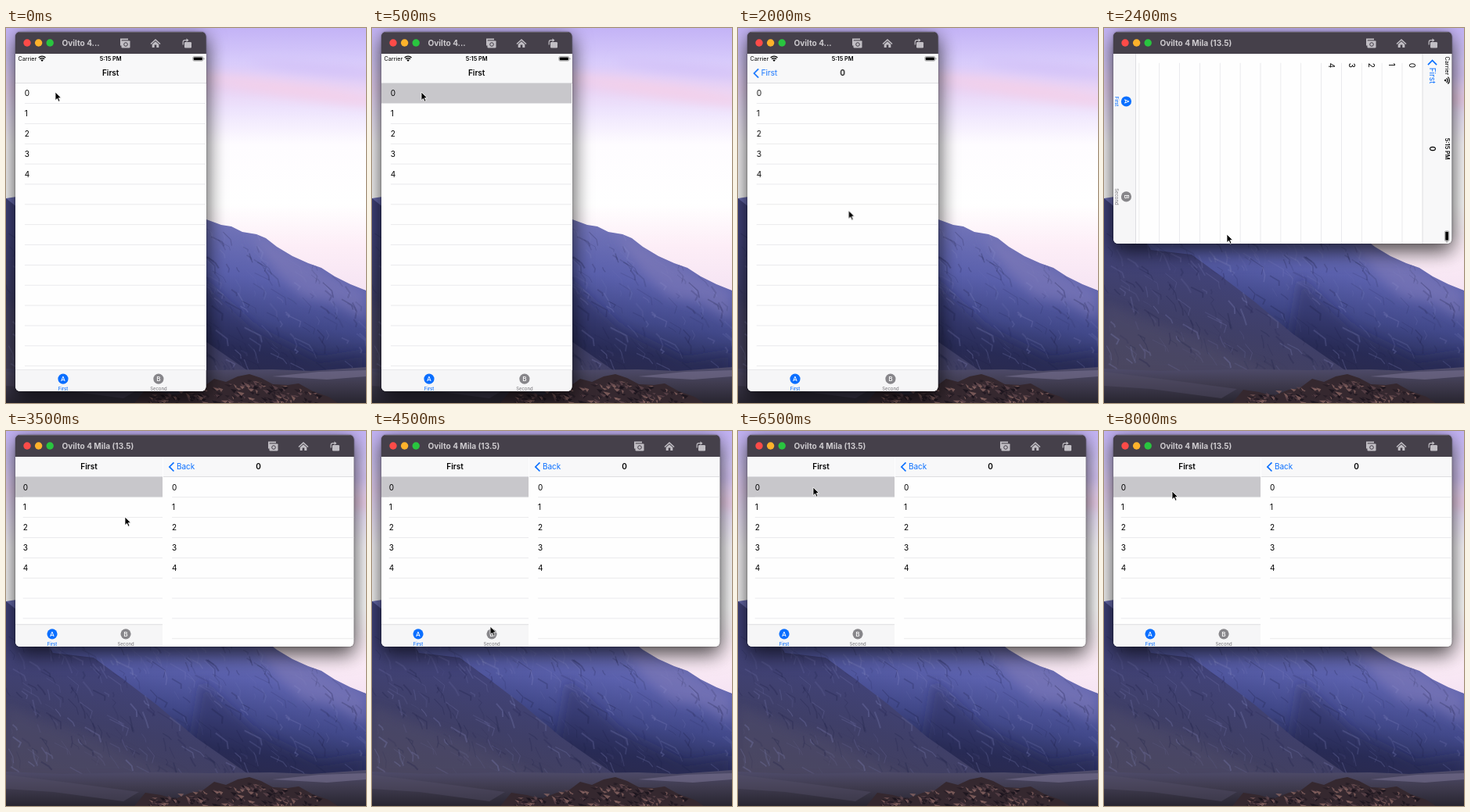
An HTML page that plays this animation: 460x480 px, repeating every 8100 ms.

```html
<!DOCTYPE html>
<html lang="en">
<head>
<meta charset="utf-8">
<title>Split view rotation</title>
<style>
html, body { margin: 0; width: 100%; height: 100%; overflow: hidden; background: #fff; }
svg { display: block; width: 460px; height: 480px; }
text { font-family: Inter, Roboto, sans-serif; }
.mid { text-anchor: middle; }
.shadow { filter: drop-shadow(0 8px 13px rgba(0,0,0,.58)) drop-shadow(0 0 1px rgba(0,0,0,.5)); }
.a { animation: 8.1s ease-in-out infinite both; }
.step { animation-timing-function: step-end; }

.tall { animation-name: tall; }
.wide { animation-name: wide; }
.press { animation-name: press; }
.root { animation-name: root; }
.push { animation-name: push; }
.oldTitle { animation-name: oldTitle; }
.newTitle { animation-name: newTitle; }
.back { animation-name: back; }
.still { animation-name: still; }
.turn { animation-name: turn; }
.settled { animation-name: settled; }
.before { animation-name: before; }
.after { animation-name: after; }
.tabA { animation-name: tabA; }
.tabB { animation-name: tabB; }
.cursor { animation-name: cursor; }

@keyframes tall { 0% { opacity: 1 } 27.16%, 100% { opacity: 0 } }
@keyframes wide { 0% { opacity: 0 } 27.16%, 100% { opacity: 1 } }
@keyframes press { 0% { opacity: 0 } 4.94%, 100% { opacity: 1 } }
@keyframes root { 0%, 6.17% { transform: none } 11.11%, 100% { transform: translate(-124px, 0) } }
@keyframes push { 0%, 6.17% { transform: translate(414px, 0) } 11.11%, 100% { transform: none } }
@keyframes oldTitle { 0%, 6.17% { transform: none; opacity: 1 } 11.11%, 100% { transform: translate(-158px, 0); opacity: 0 } }
@keyframes newTitle { 0%, 6.17% { transform: translate(190px, 0); opacity: 0 } 11.11%, 100% { transform: none; opacity: 1 } }
@keyframes back { 0%, 6.17% { transform: translate(158px, 0); opacity: 0 } 11.11%, 100% { transform: none; opacity: 1 } }
@keyframes still { 0% { visibility: visible } 30.25%, 100% { visibility: hidden } }
@keyframes turn { 0% { visibility: hidden } 30.25% { visibility: visible } 35.2%, 100% { visibility: hidden } }
@keyframes settled { 0% { visibility: hidden } 35.2%, 100% { visibility: visible } }
@keyframes before {
  0%, 30.25% { transform: rotate(90deg); opacity: 1 }
  35.2%, 100% { transform: rotate(0deg); opacity: 0 }
}
@keyframes after {
  0%, 30.25% { transform: rotate(90deg); opacity: 0 }
  35.2%, 100% { transform: rotate(0deg); opacity: 1 }
}
@keyframes tabA { 0% { opacity: 1 } 61.73% { opacity: 0 } 72.84%, 100% { opacity: 1 } }
@keyframes tabB { 0% { opacity: 0 } 61.73% { opacity: 1 } 72.84%, 100% { opacity: 0 } }
@keyframes cursor {
  0%, 18.5% { transform: translate(63px, 82px) }
  27.16%, 33.3% { transform: translate(157px, 264px) }
  42%, 46% { transform: translate(152px, 110px) }
  58%, 67.3% { transform: translate(151px, 263px) }
  72.2%, 74.5% { transform: translate(60px, 260px) }
  80.25%, 88.9% { transform: translate(96px, 72px) }
  98.5%, 100% { transform: translate(87px, 77px) }
}
</style>
</head>
<body>
<svg viewBox="0 0 460 480" xmlns="http://www.w3.org/2000/svg">
  <defs>
    <linearGradient id="sky" x2="0" y2="1">
      <stop offset="0" stop-color="#c3b3f6"/>
      <stop offset=".09" stop-color="#d8cbfb"/>
      <stop offset=".16" stop-color="#e8d3f5"/>
      <stop offset=".22" stop-color="#eee4fd"/>
      <stop offset=".31" stop-color="#fefcff"/>
      <stop offset=".47" stop-color="#fff"/>
      <stop offset=".58" stop-color="#fdeef7"/>
      <stop offset=".72" stop-color="#f4e2f2"/>
    </linearGradient>
    <linearGradient id="far" gradientUnits="userSpaceOnUse" x1="330" y1="255" x2="300" y2="440">
      <stop offset="0" stop-color="#7274b8"/>
      <stop offset=".35" stop-color="#5a60ac"/>
      <stop offset=".62" stop-color="#414889"/>
      <stop offset=".85" stop-color="#292e5a"/>
      <stop offset="1" stop-color="#2c2d4e"/>
    </linearGradient>
    <linearGradient id="near" gradientUnits="userSpaceOnUse" x1="100" y1="280" x2="60" y2="450">
      <stop offset="0" stop-color="#42447e"/>
      <stop offset=".5" stop-color="#3f3f68"/>
      <stop offset="1" stop-color="#454159"/>
    </linearGradient>
    <linearGradient id="plain" x2="0" y2="1">
      <stop offset="0" stop-color="#4f4c6c"/>
      <stop offset=".45" stop-color="#403c50"/>
      <stop offset="1" stop-color="#282530"/>
    </linearGradient>
    <filter id="soft" x="-30%" y="-100%" width="160%" height="300%"><feGaussianBlur stdDeviation="7"/></filter>
    <clipPath id="hill"><path d="M0 218L120 200 220 222 256 245 275 252 288 254 302 261 320 264 332 269 346 280 366 292 386 301 403 307 420 318 440 328 460 336V445H0Z"/></clipPath>
    <clipPath id="tallClip"><rect x="12" y="5" width="243.5" height="460" rx="6"/></clipPath>
    <clipPath id="wideClip"><rect x="12" y="5" width="432.5" height="271" rx="6"/></clipPath>
  </defs>

  <rect width="460" height="480" fill="url(#sky)"/>
  <g filter="url(#soft)">
    <ellipse cx="370" cy="80" rx="130" ry="9" fill="#f3d0ea" transform="rotate(8 370 80)"/>
    <ellipse cx="400" cy="52" rx="90" ry="7" fill="#d3c2f8" transform="rotate(6 400 52)"/>
  </g>
  <g clip-path="url(#hill)">
    <rect y="190" width="460" height="260" fill="url(#far)"/>
    <g filter="url(#soft)">
      <path d="M310 262L345 280 403 310 460 337V375L420 352 380 345 350 318Z" fill="#8d83bd" opacity=".45"/>
      <path d="M250 320L320 385 400 425 460 415V450H230Z" fill="#23264e" opacity=".4"/>
    </g>
    <path d="M0 218L40 250 60 284 112 290 150 318 192 350 242 392 318 445H0Z" fill="url(#near)"/>
    <path d="M0 350L50 372 110 392 190 430 230 445H0Z" fill="#56526e" opacity=".35" filter="url(#soft)"/>
    <g id="ridges" fill="none"></g>
  </g>
  <path d="M0 436L70 439 190 437 260 438 340 437 390 439 460 434V480H0Z" fill="url(#plain)"/>
  <path d="M340 446L400 440 460 438V446L410 450Z" fill="#77708f" opacity=".6"/>
  <path d="M0 440L80 450 170 462 150 474 60 462 0 458Z" fill="#55506a" opacity=".4"/>
  <path d="M164 480L178 463 198 466 216 471 236 463 250 461 266 449 281 453 296 446 311 443 326 448 341 456 360 457 374 455 392 465 412 472 424 480Z" fill="#35282f"/>
  <g id="rocks"></g>

  <g id="windows"></g>
  <g class="a cursor"><path d="M0 0V10.6L2.5 8.3 4.2 12.2 6 11.4 4.3 7.6H7.6Z" stroke="#fff" stroke-width=".8"/></g>
</svg>

<script>
const BLUE = '#0a6fff', GRAY = '#87868a', LINE = '#e6e6e9', EDGE = '#d3d3d7';
const $ = id => document.getElementById(id);

const rect = (x, y, w, h, fill, more = '') =>
  `<rect x="${x}" y="${y}" width="${w}" height="${h}" fill="${fill}" ${more}/>`;
const text = (x, y, size, s, more = '') =>
  `<text x="${x}" y="${y}" font-size="${size}" ${more}>${s}</text>`;
const group = (cls, s) => `<g class="${cls}">${s}</g>`;
const move = (x, y, s) => `<g transform="translate(${x} ${y})">${s}</g>`;
const title = (x, y, s) => text(x, y, 17, s, 'class="mid" font-weight="600"');

// Screen content is laid out in points; one point is PT pixels.
const PT = 432.5 / 736, ROW = 44;

function list(w, h, first, inset, mark = '') {
  let s = rect(0, 0, w, h, '#fefefe') + mark;
  for (let i = 0; i < 5; i++) s += text(inset, i * ROW + 28.5, 17, first + i);
  for (let y = ROW; y < h; y += ROW) s += rect(inset, y - .6, w - inset, 1.4, LINE);
  return s;
}

const selected = w => rect(0, 0, w, ROW, '#c8c7cb');

const backButton = (y, s) =>
  `<path d="M24 ${y - 9.5}L14.5 ${y}L24 ${y + 9.5}" fill="none" stroke="${BLUE}" stroke-width="2.8"/>` +
  text(30, y + 6, 17, s, `fill="${BLUE}"`);

function tabBar(w, active) {
  const tab = (i, letter, label) => {
    const x = w * (.25 + i * .5), c = i === active ? BLUE : GRAY;
    return `<circle cx="${x}" cy="21" r="11.2" fill="${c}"/>` +
      text(x, 26, 14, letter, 'class="mid" fill="#fff" font-weight="500"') +
      text(x, 46, 10, label, `class="mid" fill="${c}" font-weight="500"`);
  };
  return rect(0, 0, w, 50, '#f6f6f7') + rect(0, 0, w, 1.2, EDGE) +
    tab(0, 'A', 'First') + tab(1, 'B', 'Second');
}

const statusBar = text(6, 15, 12.3, 'Carrier') +
  `<g fill="none" stroke="#000" stroke-width="2.1"><path d="M50.5 8.500A10.5 10.5 0 0 1 65.500 8.500M53 11.500A7 7 0 0 1 63 11.500"/></g>
   <path d="M55 13.700A4.300 4.300 0 0 1 61 13.700L58 17Z"/>` +
  text(207, 15, 12.6, '5:15 PM', 'class="mid" font-weight="600"') +
  rect(386, 6, 22, 9.5, 'none', 'rx="2.5" stroke="#777" stroke-width="1"') +
  rect(387.5, 7.5, 19, 6.5, '#000', 'rx="1.3"') + rect(409, 9, 1.6, 3.5, '#777');

function phone(live) {
  const cls = name => live ? 'a ' + name : '';
  const root = live ? group('a root', list(414, 623, 0, 20, group('a step press', selected(414)))) : '';
  return rect(0, 0, 415, 737, '#fff') +
    move(0, 64, root + group(cls('push'), list(415, 623, 0, 20))) +
    rect(0, 0, 415, 64, '#f8f8f9') + rect(0, 63.2, 415, 1.2, EDGE) + statusBar +
    (live ? group('a oldTitle', title(207, 48.5, 'First')) : '') +
    group(cls('newTitle'), title(207, 48.5, '0')) +
    group(cls('back'), backButton(42.5, 'First')) +
    move(0, 687, tabBar(415, 0));
}

function split() {
  const bar = w => rect(0, 0, w, ROW, '#f8f8f9') + rect(0, 43, w, 1.2, EDGE);
  const side = (cls, name, first, active, mark) => group('a step ' + cls,
    move(0, ROW, list(320, 322, first, 16.5, mark)) + bar(320) +
    title(160, 28, name) + move(0, 365, tabBar(320, active)));
  const detail = move(0, ROW, list(416, 371, 0, 20)) + bar(416) +
    title(208, 28, '0') + backButton(22, 'Back');
  return rect(0, 0, 736, 415, '#fff') +
    side('tabA', 'First', 0, 0, selected(320)) + side('tabB', 'Second', 5, 1) +
    move(320.5, 0, detail) + rect(320, 0, 1.2, 415, '#cdcdd1');
}

const icons = [
  `<path d="M-6 -6H4V-4H-4V3H-6Z"/><rect x="-4.500" y="-3.500" width="11" height="9.500" rx="1.300"/>
   <g fill="none" stroke="#45404a"><circle cx="1" cy="1.500" r="2.300"/><path d="M-4.500 -3.500H6" stroke-width=".7"/></g>`,
  `<path d="M-6.500 .5L0 -5.500 6.500 .5 5.500 1.500 0 -3.500 -5.500 1.500ZM-4.300 1.500L0 -2.300 4.300 1.500V5.500H1.300V2H-1.300V5.500H-4.300Z"/>`,
  `<rect x="-3" y="-1.500" width="9" height="7.500" rx="1.200"/>
   <path d="M-4.800 2V-1.500Q-4.800 -3.800 -2.500 -3.800H0" fill="none" stroke="#c1bec4" stroke-width="1.200"/><path d="M-.5 -6.200L2.500 -3.800 -.5 -1.400Z"/>`
];

function frame(cls, clip, w, h, name, iconX, screen) {
  const lights = ['#fc4b48', '#fdb22b', '#29c53f'].map((c, i) =>
    `<circle cx="${27 + i * 14.6}" cy="19" r="4.7" fill="${c}"/>`).join('');
  const tools = iconX.map((x, i) => move(x, 19.5, icons[i])).join('');
  return group('a step ' + cls,
    rect(12, 5, w, h, '#45404a', 'rx="6" class="shadow"') +
    `<g clip-path="url(#${clip})">` + rect(12, 5, w, 29, '#45404a') + rect(12, 5, w, .8, '#6b6670') + lights +
    text(71.5, 22.8, 10.1, name, 'fill="#cdcace" font-weight="700"') +
    `<g fill="#c1bec4">${tools}</g>` +
    `<g transform="translate(12 33) scale(${PT})">${screen}</g></g>`);
}

// Resting views sit outside the turning layer so their text stays sharp.
const turning =
  group('a step still', `<g transform="translate(736 0) rotate(90)">${phone(false)}</g>`) +
  group('a step turn', rect(0, 0, 736, 415, '#000') + move(368, 207,
    group('a after', move(-368, -207, split())) +
    group('a before', move(-207, -368, phone(false))))) +
  group('a step settled', split());

$('windows').innerHTML =
  frame('tall', 'tallClip', 243.5, 460, 'Ovilto 4...', [152, 191, 231], phone(true)) +
  frame('wide', 'wideClip', 432.5, 271, 'Ovilto 4 Mila (13.5)', [341, 380, 420], turning);

// Seeded rock texture
let seed = 11;
const rnd = (a, b) => a + (b - a) * ((seed = seed * 16807 % 2147483647) / 2147483647);

let ridges = '';
for (let i = 0; i < 420; i++) {
  const x = rnd(0, 460), y = rnd(245, 432), len = rnd(5, 20), lean = rnd(.1, 1.3);
  ridges += `<path d="M${x} ${y}l${len * lean} ${len * .6}l${rnd(-3, 5)} ${len * .5}" stroke="${i % 2 ? '#8a8cc6' : '#191b42'}" stroke-width="${rnd(.6, 2.2)}" opacity="${rnd(.08, .26)}"/>`;
}
$('ridges').innerHTML = ridges;

let rocks = '';
for (let i = 0; i < 190; i++) {
  const x = rnd(180, 404), top = 449 + Math.abs(x - 305) * .17;
  const y = rnd(top, 480), w = rnd(3, 10);
  rocks += `<path d="M${x} ${y}l${w} ${rnd(0, 4)}l${-w * .4} ${rnd(1, 4)}Z" fill="${['#8f6a66', '#17121b', '#5f464c', '#241b24'][i % 4]}" opacity=".75"/>`;
}
$('rocks').innerHTML = rocks;
</script>
</body>
</html>
```
